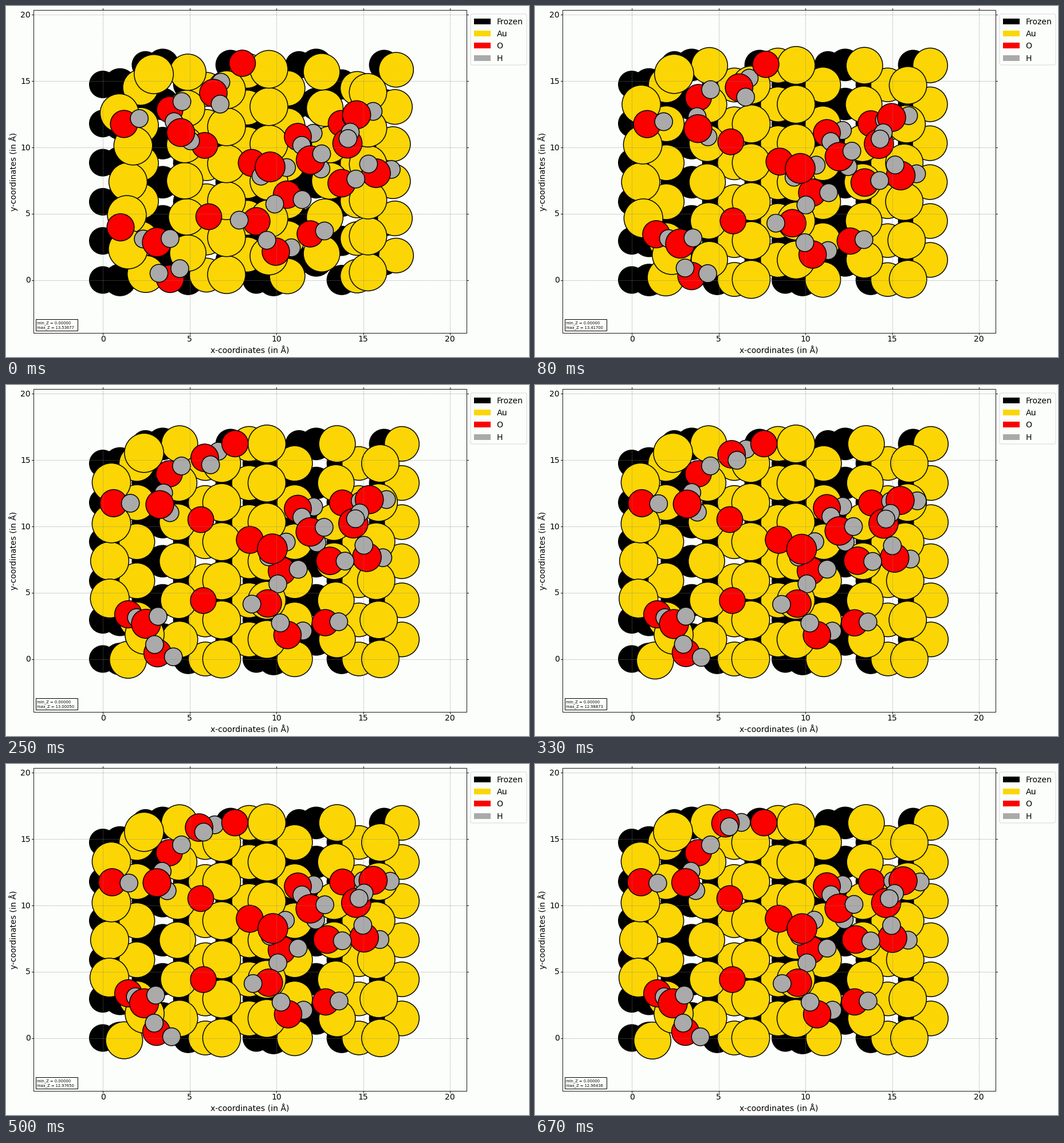
A matplotlib script for the animation above (710 ms loop, 913x613 px).

```python
import numpy as np
import matplotlib.pyplot as plt
from matplotlib.animation import FuncAnimation
from matplotlib.patches import Circle, FancyBboxPatch, Rectangle

W, H, DPI = 913, 613, 100
LOOP, STEPS, TICK = 710, 17, 10
PT = 72 / DPI  # points per pixel
PAPER, BLACK, GOLD, RED, GREY = "#fcfefb", "black", "#fbd604", "#fc0000", "#a9aaa9"
ROW = 68.3  # distance between atoms of a column
BOND = np.array([29.4, -22.5])  # O-H bond along each axis, y pointing up

STARTS = [round(LOOP * i / STEPS, -1) for i in range(STEPS)]

plt.rcParams["font.family"] = "DejaVu Sans"
fig = plt.figure(figsize=(W / DPI, H / DPI), dpi=DPI, facecolor=PAPER)
ax = fig.add_axes([0, 0, 1, 1])
ax.set_xlim(0, W)
ax.set_ylim(H, 0)
ax.axis("off")

atoms = []  # (patch, function giving the centre at a step)


def label(x, y, s, size=14, **kw):
    kw = {"ha": "center", "va": "center", "zorder": 12, **kw}
    return ax.text(x, y, s, fontsize=size * PT, **kw)


def line(xs, ys, color="black", **kw):
    ax.plot(xs, ys, color=color, lw=0.9 * PT, **kw)


def disc(x, y, r, color, z):
    return ax.add_patch(Circle((x, y), r - 0.4, fc=color, ec="black",
                               lw=1.5 * PT, zorder=z))


def glide(a, b, pace, step):
    """Relax from a to b; a small pace settles early."""
    part = np.expm1(-step / pace) / np.expm1(-(STEPS - 1) / pace)
    return np.asarray(a) + np.subtract(b, a) * part


def add(color, r, z, place):
    atoms.append((disc(*place(0), r, color, z), place))


def gold(r, start, end, pace=0.9):
    add(GOLD, r, 1 + r / 100, lambda s: glide(start, end, pace, s))


def column(r, x0, x1, squeeze, half=0, bow0=0, bow1=0, first=0):
    """Gold column that starts squeezed and bowed, then relaxes."""
    mid = 307.75 - 34.15 * half
    for k in range(first, 6):
        y, wave = ROW * (2.5 - k), np.cos(2 * np.pi * k / 5)
        gold(r, (x0 + bow0 * wave, mid + squeeze * y), (x1 + bow1 * wave, mid + y))


def molecule(start, end, pace, r=24.2, low=(), high=()):
    """Oxygen with hydrogens (angle, end angle, reach, end reach) around it."""
    def oxygen(s):
        return glide(start, end, pace, s)

    def hydrogen(a0, a1, reach0, reach1=None):
        def place(s):
            a, reach = glide((a0, reach0), (a1, reach1 or reach0), pace, s)
            a = np.radians(a)
            return oxygen(s) + reach * BOND * (np.cos(a), np.sin(a))
        add(GREY, 16, 2 + len(atoms) / 100, place)

    for h in low:
        hydrogen(*h)
    add(RED, r, 2 + len(atoms) / 100, oxygen)
    for h in high:
        hydrogen(*h)


# Axes frame, ticks, grid
ax.add_patch(Rectangle((48, 7), 756, 564, fill=False, lw=0.9 * PT, zorder=11))
for k in range(5):
    x, y = 169 + 151.5 * k, 478.5 - 115.8 * k
    line([x, x], [7, 571], "#808080", ls=":", zorder=10)
    line([48, 804], [y, y], "#808080", ls=":", zorder=10)
    for a, b in ((571, 574), (4, 7)):
        line([x, x], [a, b], zorder=11)
    for a, b in ((45, 48), (804, 807)):
        line([a, b], [y, y], zorder=11)
    label(x, 582.5, str(5 * k))
    label(43, y + 0.7, str(5 * k), ha="right")
label(426, 602, "x-coordinates (in Å)")
label(13.5, 289, "y-coordinates (in Å)", rotation=90)

# Legend
ax.add_patch(FancyBboxPatch((814, 17), 92, 83, fc=PAPER, ec="#d8d8e0",
                            boxstyle="round,pad=3,rounding_size=3", lw=PT))
for i, (name, color) in enumerate(
        zip(("Frozen", "Au", "O", "H"), (BLACK, GOLD, RED, GREY))):
    y = 26.5 + 21.4 * i
    ax.add_patch(Rectangle((817, y - 5), 28.5, 10, fc=color, zorder=11))
    label(856.5, y + 5, name, ha="left", va="baseline")

# Height readout
ax.add_patch(Rectangle((51.5, 547), 73, 20, fc=PAPER, ec="black",
                       lw=PT, zorder=11))
label(54, 555.2, "min_Z = 0.00000", 6.8, ha="left", va="baseline")
readout = label(54, 563.4, "", 6.8, ha="left", va="baseline")
Z_STEPS = [0, 2, 4, 6, 10, 14, 16]
Z_MAX = [13.53677, 13.41700, 13.11474, 13.00050, 12.97695, 12.97605, 12.96436]

# Frozen slab: two cells of six columns, every other one shifted by half a row
for cell in (0, 268):
    for i in range(6):
        x = 169 + cell + 74.5 * (i // 2) + 30 * (i % 2) * (i < 4) + 74 * (i == 5)
        half = i // 2 % 2 if i < 4 else i - 4
        r = 26 if i > 3 else 28 if i % 2 else 23.7
        for k in range(6):
            disc(x, 478.5 - ROW * (k + half / 2), r, BLACK, r / 100)

# Lower gold layer
column(31.5, 235, 228.5, 0.97, first=1)
column(30, 350, 348, 0.95)
column(30.8, 421, 424.5, 0.94, half=1)
column(31.3, 491, 504, 0.96)
column(29.8, 613, 616, 0.96)
column(30.7, 678, 691, 0.95, half=1, bow0=3)

# Upper gold layer, with the loose step edge on the left
column(32.1, 314.5, 301, 0.925, half=1, bow0=3, bow1=2)
column(33.5, 385, 376.5, 0.945)
column(33.4, 459, 455.5, 0.955, half=1)
column(32.3, 559, 575, 0.93, half=1, bow0=-8, bow1=3)
column(33.1, 632, 649.5, 0.92, bow1=4)
gold(34.6, (258, 119), (241, 118.5))
gold(34, (198, 187), (184, 170))
gold(34.1, (222, 244), (184, 242))
gold(33.8, (213, 307), (181, 307.3))
gold(34.3, (211, 365), (180.5, 373), 1.6)
gold(34.5, (213, 425), (242, 436))
gold(32.7, (244, 468), (205, 483), 4)

# Water and hydroxyl, lowest first
molecule((206, 206), (185, 206.5), 3, high=[(25, -4, 1)])
molecule((286, 181), (285, 155), 1.2, 23.4, high=[(41, 40, 0.95)])
molecule((347, 243.5), (340, 235), 1.5, 23)
molecule((305, 221), (263, 207), 3, 24.8,
         low=[(115, 70, 0.93), (-48, -46, 0.87)])
molecule((362, 152), (332.5, 103.5), 14, 24.5,
         low=[(62, 4, 0.95)], high=[(-65, -50, 0.95, 0.35)])
molecule((412.5, 100), (399.5, 102.5), 1.5, 23.4)
molecule((509.5, 228.5), (509.5, 213.5), 3.5, 24,
         low=[(17, 7, 0.95)], high=[(-71, -70, 0.7)])
molecule((531.5, 269), (531, 252), 5, 25.3,
         low=[(-48, -71, 0.93)], high=[(36, 19, 0.82, 0.93)])
molecule((585, 205), (587.5, 206), 3, 23)
molecule((612, 190), (642.5, 204), 5, 25,
         low=[(216, 180, 0.38, 0.61), (15, -5, 1.02)])
molecule((596, 240), (613, 242.7), 8, 26,
         high=[(79, 56, 0.89), (85, 61, 0.38)])
molecule((646, 292), (624, 304), 5, 25.5,
         low=[(18, -10, 0.95)], high=[(122, 93, 0.84, 0.98)])
molecule((586, 309.5), (560, 306.5), 4, 24.5, high=[(21, -7, 0.9)])
molecule((429, 274), (425.5, 270.3), 2, 24)
molecule((490.5, 329.5), (481.5, 324.7), 1.5, 24.3,
         high=[(-23, 8, 0.98), (225, 257, 1.03)])
molecule((461, 281), (466, 287.5), 4, 26.5,
         low=[(-3, 42, 0.98), (233, 255, 0.9, 0.6)])
molecule((354, 368), (344.5, 376.5), 1, 23)
molecule((437, 376), (459, 382), 2.5, 24.4, high=[(175, 184, 1.02, 0.94)])
molecule((471, 429), (492.5, 437), 2, 24.4,
         low=[(18, 19, 0.97)], high=[(121, 114, 1.03)])
molecule((531, 398), (558, 415.5), 1.6, 23.4, high=[(15, 5, 0.88, 0.8)])
molecule((200, 386.5), (213.5, 400.5), 1)
molecule((263.5, 412.5), (240.5, 418), 3.5, 25.8,
         low=[(163, 135, 0.85, 0.72)], high=[(20, 43, 0.83, 0.94)])
molecule((286.5, 476.5), (262.5, 467.5), 2.5, 24.4,
         high=[(54, -24, 0.98), (147, 101, 0.79, 0.68)])


def draw(n):
    step = np.searchsorted(STARTS, n * TICK, side="right") - 1
    for patch, place in atoms:
        patch.center = tuple(place(step))
    readout.set_text(f"max_Z = {np.interp(step, Z_STEPS, Z_MAX):.5f}")
    return [patch for patch, _ in atoms] + [readout]


anim = FuncAnimation(fig, draw, frames=LOOP // TICK, interval=TICK,
                     init_func=lambda: draw(0), repeat=True, repeat_delay=0)
plt.show()
```
